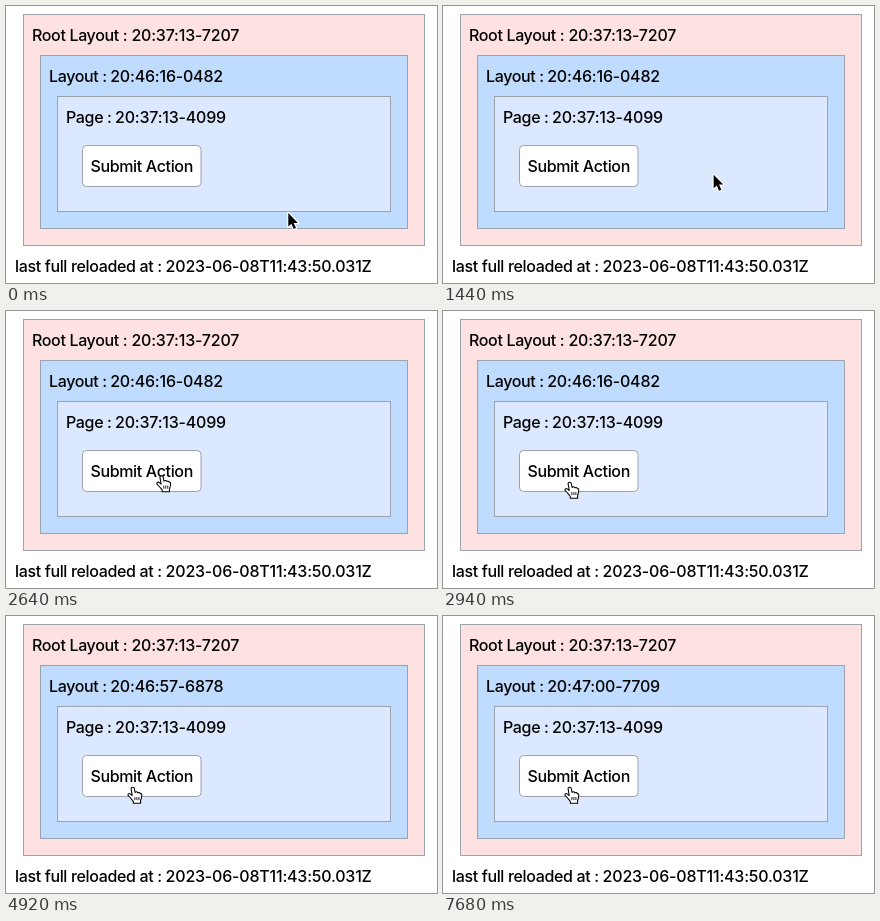
An HTML page for the animation above (8000 ms loop, 431 by 277 pixels).

```html
<!DOCTYPE html>
<html lang="en">
<head>
<meta charset="utf-8">
<title>Nested layouts</title>
<style>
  html, body { margin: 0; width: 100%; height: 100%; overflow: hidden; background: #fff; }
  svg { display: block; }
  text { font: 450 16px Inter, "Liberation Sans", sans-serif; letter-spacing: -0.35px; }
  .value { letter-spacing: -0.2px; }
  .box { stroke: #9ca3af; }
  .halo { fill: none; stroke: #fff; stroke-width: 2.4; stroke-linejoin: round; }
</style>
</head>
<body>
<svg width="431" height="277">
  <defs><path id="arrowShape" d="M0 0V13.6L3.1 10.8 5.4 16 7.7 15 5.4 9.9H9.6Z"/></defs>
  <g id="layers"></g>
  <rect class="box" x="76.5" y="139.5" width="118.5" height="41" rx="4" fill="#fff"/>
  <text x="135.7" y="166" text-anchor="middle">Submit Action</text>
  <text x="9" y="266">last full reloaded at :</text>
  <text class="value" x="159.6" y="266">2023-06-08T11:43:50.031Z</text>

  <circle id="ring" r="9.8" fill="none" stroke="#000"/>
  <g id="arrow"><use href="#arrowShape" class="halo"/><use href="#arrowShape"/></g>
  <g id="hand"><g transform="scale(.95)" fill="#fff" stroke="#000" stroke-width="1.1" stroke-linejoin="round">
    <path d="M-2 1.8C-2.2 -.1 1-.3 1.4 1.6L2.2 5.8C3 4.7 4.8 4.9 5.1 6.2 6 5.4 7.4 5.8 7.7 7 8.7 6.6 9.3 7.3 9.2 8.7 9.1 12 8.2 12.6 8 14.5V17H.3V15C-1.3 13.2-2.8 11.2-4.9 9.2-6.2 7.4-4.2 6.2-2.6 7.5L-.8 9Z"/>
    <path d="M2 10.5V13.8M4.1 10.5V13.8M6.2 10.5V13.8" stroke-width=".9"/>
  </g></g>
</svg>
<script>
const LOOP = 8000, STEP = 60, HAND_FROM = 2160;
const $ = id => document.getElementById(id);

const layers = [
  { label: "Root Layout :", valueX: 125.4, value: "20:37:13-7207", fill: "#fee2e2" },
  { label: "Layout :", valueX: 104.2, value: "", fill: "#bfdbfe" },
  { label: "Page :", valueX: 109, value: "20:37:13-4099", fill: "#dbe8fe" }
];
$("layers").innerHTML = layers.map(({ label, valueX, value, fill }, i) => {
  const x = 17.5 + 17 * i, y = 8.5 + 41 * i, baseline = 35 + 41 * i;
  return `<rect class="box" x="${x}" y="${y}" width="${401 - 34 * i}" height="${231 - 58 * i}" fill="${fill}"/>
    <text x="${x + 8.5}" y="${baseline}">${label}</text>
    <text class="value" x="${valueX}" y="${baseline}">${value}</text>`;
}).join("");
const stamp = document.querySelectorAll(".value")[1];

// Each click shows a ring for one step, then the layout's stamp updates.
const clicks = [
  { time: 600, stamp: "20:46:16-0482" },
  { time: 3660, stamp: "20:46:56-5386" },
  { time: 4860, stamp: "20:46:57-6878" },
  { time: 6540, stamp: "20:46:59-3994" },
  { time: 7620, stamp: "20:47:00-7709" }
];

const lerp = (a, b, p) => a + (b - a) * p;
const easeOut = (p, power) => 1 - (1 - p) ** power;
const easeInOut = p => p * p * (3 - 2 * p);
const progress = (t, from, to) => Math.min(1, Math.max(0, (t - from) / (to - from)));

function pointerAt(t) {
  const start = [282.3, 207], side = [291, 183], edge = [163, 163], button = [127, 171];
  if (t < 1980) {
    // Swing left, up and round to the right.
    const p = progress(t, 1200, 1680), arc = Math.sin(Math.PI * p);
    return [
      lerp(start[0], side[0], p) - 16 * (arc + Math.sin(2 * Math.PI * p)),
      lerp(start[1], side[1], p) - 26.3 * arc
    ];
  }
  if (t < 2520) {
    const p = progress(t, 1980, 2220);
    return [lerp(side[0], edge[0], easeOut(p, 1.4)), lerp(side[1], edge[1], easeOut(p, 2.4))];
  }
  const p = easeInOut(progress(t, 2520, 2940));
  return edge.map((from, axis) => lerp(from, button[axis], p));
}

function place(id, visible, x, y) {
  $(id).style.display = visible ? "" : "none";
  $(id).setAttribute("transform", `translate(${x} ${y})`);
}

function render(now) {
  const t = Math.floor((now % LOOP) / STEP) * STEP;
  const [x, y] = pointerAt(t);
  place("arrow", t < HAND_FROM, x, y);
  place("hand", t >= HAND_FROM, x, y);
  place("ring", clicks.some(({ time }) => t === time), x + 0.7, y - 0.9);

  const done = clicks.filter(({ time }) => t > time);
  stamp.textContent = (done.pop() || clicks[0]).stamp;
}

const start = performance.now();
function tick() {
  render(performance.now() - start);
  requestAnimationFrame(tick);
}
tick();
</script>
</body>
</html>
```
